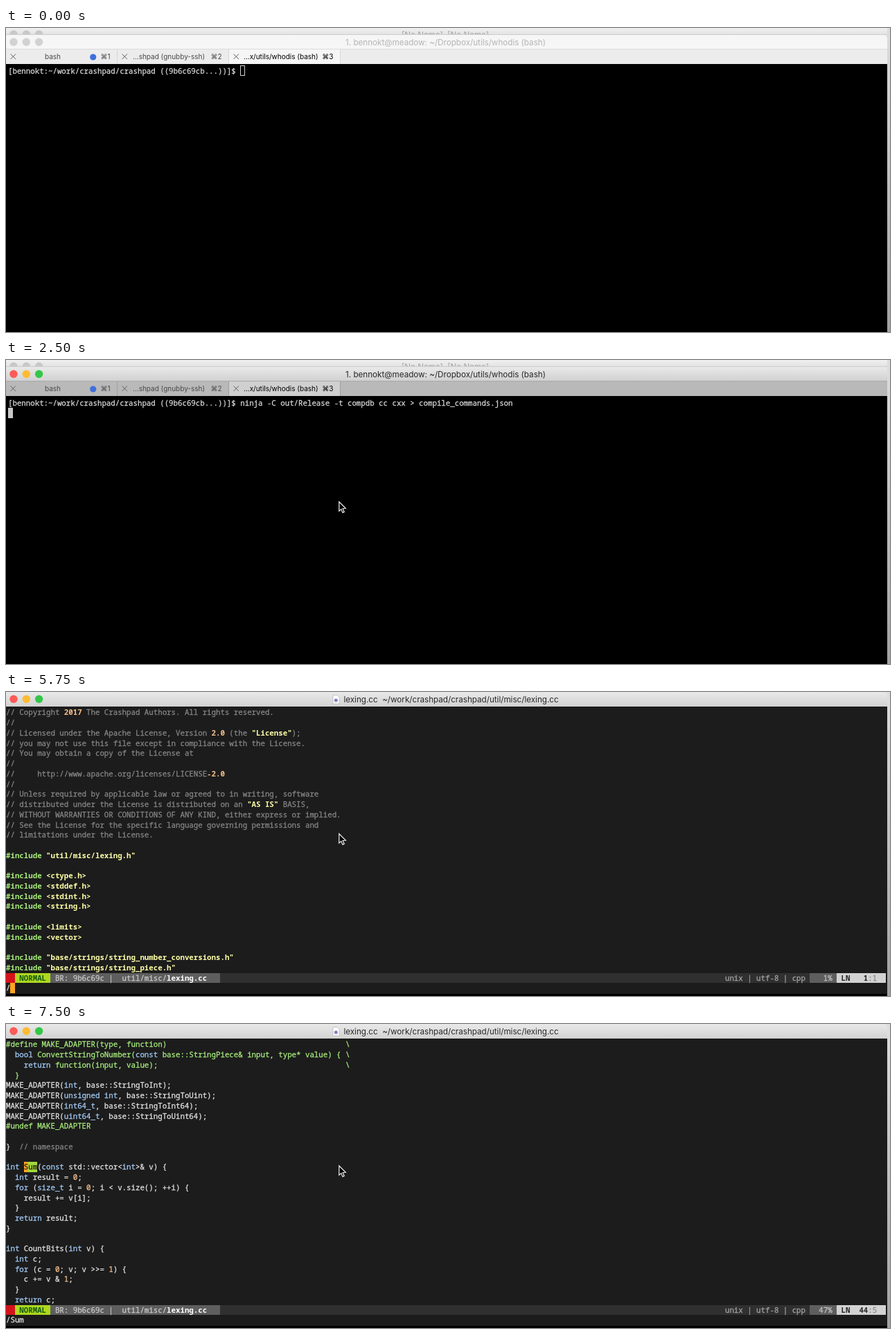
An HTML page with a canvas for the animation above (8000 ms loop, 1276 by 439 pixels).

```html
<!DOCTYPE html>
<html lang="en">
<head>
<meta charset="utf-8">
<title>Terminal session</title>
<style>
html, body { margin: 0; width: 100%; height: 100%; overflow: hidden; background: #000; }
canvas { display: block; }
</style>
</head>
<body>
<canvas id="stage" width="1276" height="439"></canvas>
<script>
const ctx = document.getElementById('stage').getContext('2d');
const LOOP = 8000;
const CELL = 6.447, LINE = 14.74;
const UI = 'Inter, Roboto, sans-serif';
const MONO = '"Noto Sans Mono", "DejaVu Sans Mono", monospace';

const PROMPT = '[bennokt:~/work/crashpad/crashpad ((9b6c69cb...))]$ ';
const NINJA = 'ninja -C out/Release -t compdb cc cxx > compile_commands.json';
const VIM = 'vim util/misc/lexing.cc';

const HEAD = `// Copyright 2017 The Crashpad Authors. All rights reserved.
//
// Licensed under the Apache License, Version 2.0 (the "License");
// you may not use this file except in compliance with the License.
// You may obtain a copy of the License at
//
//     http://www.apache.org/licenses/LICENSE-2.0
//
// Unless required by applicable law or agreed to in writing, software
// distributed under the License is distributed on an "AS IS" BASIS,
// WITHOUT WARRANTIES OR CONDITIONS OF ANY KIND, either express or implied.
// See the License for the specific language governing permissions and
// limitations under the License.

#include "util/misc/lexing.h"

#include <ctype.h>
#include <stddef.h>
#include <stdint.h>
#include <string.h>

#include <limits>
#include <vector>

#include "base/strings/string_number_conversions.h"
#include "base/strings/string_piece.h"`.split('\n');

const BODY = `#define MAKE_ADAPTER(type, function)
  bool ConvertStringToNumber(const base::StringPiece& input, type* value) {
    return function(input, value);
  }
MAKE_ADAPTER(int, base::StringToInt);
MAKE_ADAPTER(unsigned int, base::StringToUint);
MAKE_ADAPTER(int64_t, base::StringToInt64);
MAKE_ADAPTER(uint64_t, base::StringToUint64);
#undef MAKE_ADAPTER

}  // namespace

int Sum(const std::vector<int>& v) {
  int result = 0;
  for (size_t i = 0; i < v.size(); ++i) {
    result += v[i];
  }
  return result;
}

int CountBits(int v) {
  int c;
  for (c = 0; v; v >>= 1) {
    c += v & 1;
  }
  return c;`.split('\n');
for (let i = 0; i < 3; i++) BODY[i] = BODY[i].padEnd(76) + '\\';

const COLOR = {
  text: '#e4e4e4', comment: '#868686', string: '#ffffa8', number: '#f6c08c',
  macro: '#a9ee7c', type: '#a3cbf6', cursor: '#ffa522', match: '#f9e6ae', found: '#a2d83c'
};

function box(x, y, w, h, color) {
  ctx.fillStyle = color;
  ctx.fillRect(x, y, w, h);
}

function disc(x, y, r, color) {
  ctx.fillStyle = color;
  ctx.beginPath();
  ctx.arc(x, y, r, 0, Math.PI * 2);
  ctx.fill();
}

function shade(y0, y1, top, bottom) {
  const g = ctx.createLinearGradient(0, y0, 0, y1);
  g.addColorStop(0, top);
  g.addColorStop(1, bottom);
  return g;
}

function label(s, x, y, size, color, align = 'left') {
  ctx.font = `400 ${size}px ${UI}`;
  ctx.textAlign = align;
  ctx.fillStyle = color;
  ctx.fillText(s, x, y);
}

// Monospaced text, one glyph per grid cell; a hairline stroke makes regular look medium.
function mono(s, x, y, color, weight = 400) {
  ctx.font = `${weight} 10.75px ${MONO}`;
  ctx.textAlign = 'left';
  ctx.fillStyle = ctx.strokeStyle = color;
  ctx.lineWidth = .28;
  for (let i = 0; i < s.length; i++) {
    if (s[i] === ' ') continue;
    ctx.fillText(s[i], x + i * CELL, y);
    if (weight < 600) ctx.strokeText(s[i], x + i * CELL, y);
  }
}

function lights(y, colors) {
  colors.forEach((c, i) => disc(11 + i * 18.3, y, 5.7, c));
}

const LIVE = ['#fc5b57', '#fdbc32', '#33c748'];

function titleBar(y, h, fill) {
  ctx.fillStyle = fill;
  ctx.beginPath();
  ctx.roundRect(-6, y, 1278, h, [5, 5, 0, 0]);
  ctx.fill();
}

function backdrop() {
  box(0, 0, 1276, 439, shade(0, 439, '#dedede', '#a2a2a2'));
}

function pointer(x, y) {
  ctx.beginPath();
  [[0, 0], [0, 13.4], [3, 10.6], [5.2, 15.6], [7.4, 14.6], [5.3, 9.7], [9.5, 9.5]]
    .forEach(([dx, dy]) => ctx.lineTo(x + .8 + dx, y + .8 + dy));
  ctx.closePath();
  ctx.fillStyle = '#000';
  ctx.fill();
  ctx.strokeStyle = '#f2f2f2';
  ctx.lineWidth = 1.2;
  ctx.stroke();
}

function tab(x, name, nameX, key, active, focused) {
  if (active) box(x, 31, 161, 21, focused ? '#d0d0d0' : '#f6f6f6');
  box(x + 160, 31, 1, 21, focused ? '#9e9e9e' : '#d8d8d8');
  ctx.strokeStyle = '#626262';
  ctx.lineWidth = 1;
  ctx.beginPath();
  ctx.moveTo(x + 6.5, 37.5);
  ctx.lineTo(x + 14, 45);
  ctx.moveTo(x + 14, 37.5);
  ctx.lineTo(x + 6.5, 45);
  ctx.stroke();
  const ink = active ? '#000' : '#484848';
  label(name, nameX, 45.3, 10, ink);
  label('⌘' + key, x + 150.5, 45.3, 10, ink, 'right');
}

function shellFrame(focused) {
  backdrop();
  box(0, 0, 1272, 12, shade(0, 10, '#f0f0f0', '#e2e2e2'));
  lights(9, ['#c8c8c8', '#c8c8c8', '#c8c8c8']);
  label('[No Name], [No Name]', 634, 14, 11.65, '#a4a4a4', 'center');
  box(0, 9, 1272, 1, '#cccccc');
  titleBar(10, 21, focused ? shade(10, 31, '#e9e9e9', '#d0d0d0') : '#f6f6f6');
  lights(20.3, focused ? LIVE : ['#d2d2d2', '#d2d2d2', '#d2d2d2']);
  label('1. bennokt@meadow: ~/Dropbox/utils/whodis (bash)', 634.5, 24.6, 11.65,
    focused ? '#282828' : '#b4b4b4', 'center');
  box(0, 31, 1272, 21, focused ? '#b9b9b9' : '#ececec');
  box(0, 30, 1272, 1, focused ? '#a9a9a9' : '#dcdcdc');
  tab(0, 'bash', 56, 1, false, focused);
  disc(125.7, 42, 4.6, '#3f70dc');
  tab(161, '…shpad (gnubby-ssh)', 183, 2, false, focused);
  tab(322, '…x/utils/whodis (bash)', 343, 3, true, focused);
  box(0, 52, 1272, 387, '#000');
}

function shellLine(row, s, cursor, hollow) {
  const y = 54 + row * LINE, base = y + 12.2;
  mono(s, 3, base, '#d6d6d6');
  if (cursor < 0) return;
  const x = 3 + cursor * CELL, top = Math.round(y);
  if (hollow) {
    ctx.strokeStyle = '#d0d0d0';
    ctx.lineWidth = 1;
    ctx.strokeRect(Math.round(x) + .5, top + .5, 6, 14);
  } else {
    box(Math.round(x), top, 7, 15, '#c8c8c8');
    if (s[cursor]) mono(s[cursor], x, base, '#000');
  }
}

function shell(t) {
  const focused = t >= 500, col = PROMPT.length;
  shellFrame(focused);
  if (t < 2500) {
    const n = t < 1000 ? 0 : t < 1250 ? 1 : 2;
    // History search completes the line but leaves the cursor in place.
    const typed = t < 1500 ? NINJA.slice(0, n) : NINJA;
    shellLine(0, PROMPT + typed, col + n, !focused);
  } else {
    shellLine(0, PROMPT + NINJA, -1);
    if (t < 2750) {
      shellLine(1, '', 0);
    } else {
      const n = t < 3500 ? 0 : t < 3750 ? 3 : 4;
      const typed = t < 4000 ? VIM.slice(0, n) : VIM;
      shellLine(1, PROMPT + typed, col + n);
    }
  }
}

const rowTop = row => 22.3 + row * LINE;

function put(s, col, row, color, weight) {
  mono(s, col * CELL, rowTop(row) + 11.1, color, weight);
}

function fillCells(col, n, row, color) {
  const x = Math.round(col * CELL), y = Math.round(rowTop(row));
  box(x, y, Math.round((col + n) * CELL) - x, Math.round(rowTop(row + 1)) - y, color);
}

function mark(s, col, row, color) {
  fillCells(col, s.length, row, color);
  put(s, col, row, '#262010');
}

const IN_COMMENT = /"[^"]*"|-?\d+(\.\d+)?/g;
const IN_CODE = /\/\/.*|\b(?:int|bool|const|return|for|unsigned|u?int64_t|size_t)\b|\b\d+\b|^#include/g;

function tokenColor(s) {
  if (s[0] === '"') return COLOR.string;
  if (s[0] === '#') return COLOR.macro;
  if (s[0] === '/') return COLOR.comment;
  return /^-?\d/.test(s) ? COLOR.number : COLOR.type;
}

function codeLine(s, row, macro) {
  const comment = s.startsWith('//'), include = s.startsWith('#include');
  const base = comment ? COLOR.comment
    : include ? COLOR.string
    : macro || s[0] === '#' ? COLOR.macro : COLOR.text;
  const weight = include ? 600 : 400;
  let at = 0;
  for (const m of s.matchAll(comment ? IN_COMMENT : IN_CODE)) {
    put(s.slice(at, m.index), at, row, base, weight);
    put(m[0], m.index, row, tokenColor(m[0]), comment ? 600 : weight);
    at = m.index + m[0].length;
  }
  put(s.slice(at), at, row, base, weight);
}

function statusLine(line, col, percent) {
  const row = 26;
  fillCells(0, 2, row, '#d4121a');
  fillCells(2, 8, row, '#aed71f');
  fillCells(10, 38, row, '#5e5e5e');
  fillCells(48, 132, row, '#303030');
  fillCells(180, 6, row, '#5e5e5e');
  fillCells(186, 11, row, '#d2d2d2');
  put('NORMAL', 3, row, '#125a10', 700);
  put('BR: 9b6c69c |  util/misc/', 11, row, '#cacaca');
  put('lexing.cc', 36, row, '#fff', 700);
  put('unix | utf-8 | cpp', 161, row, '#a4a4a4');
  put((percent + '%').padStart(3), 182, row, '#c4c4c4');
  put('LN', 187, row, '#262626', 700);
  put(String(line).padStart(2), 191, row, '#262626', 700);
  put(':' + col, 193, row, '#8a8a8a');
}

function editorFrame() {
  backdrop();
  titleBar(0, 22, shade(0, 21, '#e9e9e9', '#d2d2d2'));
  lights(10.3, LIVE);
  ctx.fillStyle = '#fff';
  ctx.strokeStyle = '#b8b8b8';
  ctx.lineWidth = .8;
  ctx.beginPath();
  [[472, 4.5], [478, 4.5], [481, 7.5], [481, 17], [472, 17]].forEach(p => ctx.lineTo(...p));
  ctx.closePath();
  ctx.fill();
  ctx.stroke();
  disc(476.3, 12, 2.5, '#7b7fc0');
  label('lexing.cc  ~/work/crashpad/crashpad/util/misc/lexing.cc', 642.5, 14.6, 11.65, '#282828', 'center');
  box(0, 21, 1272, 418, '#000');
  box(0, 21, 1272, 415, '#1c1c1c');
}

function editor(t) {
  editorFrame();
  const moved = t >= 6500;
  (moved ? BODY : HEAD).forEach((s, i) => codeLine(s, i, moved && i < 4));

  if (t < 5750) {
    mark('/', 0, 0, COLOR.cursor);
    put('"util/misc/lexing.cc" 92 lines --1%--', 0, 27, COLOR.text);
  } else {
    const query = t < 6250 ? '/' : t < 6500 ? '/S' : '/Sum';
    put(query, 0, 27, COLOR.text);
    if (t < 7250) fillCells(query.length, 1, 27, COLOR.cursor);
  }

  if (t >= 7250) {
    mark('S', 4, 12, COLOR.cursor);
    mark('um', 5, 12, COLOR.found);
  } else if (moved) {
    mark('Sum', 4, 12, COLOR.match);
  } else if (t >= 6250) {
    mark('S', 43, 6, COLOR.match);
  }

  if (moved) statusLine(44, 5, 47);
  else if (t >= 6250) statusLine(7, 44, 7);
  else statusLine(1, 1, 1);
}

function draw() {
  const t = performance.now() % LOOP;
  if (t < 5000) shell(t);
  else editor(t);
  if (t >= 500) pointer(480, 204);
  else if (t >= 250) pointer(513, 157);
  requestAnimationFrame(draw);
}
draw();
</script>
</body>
</html>
```
